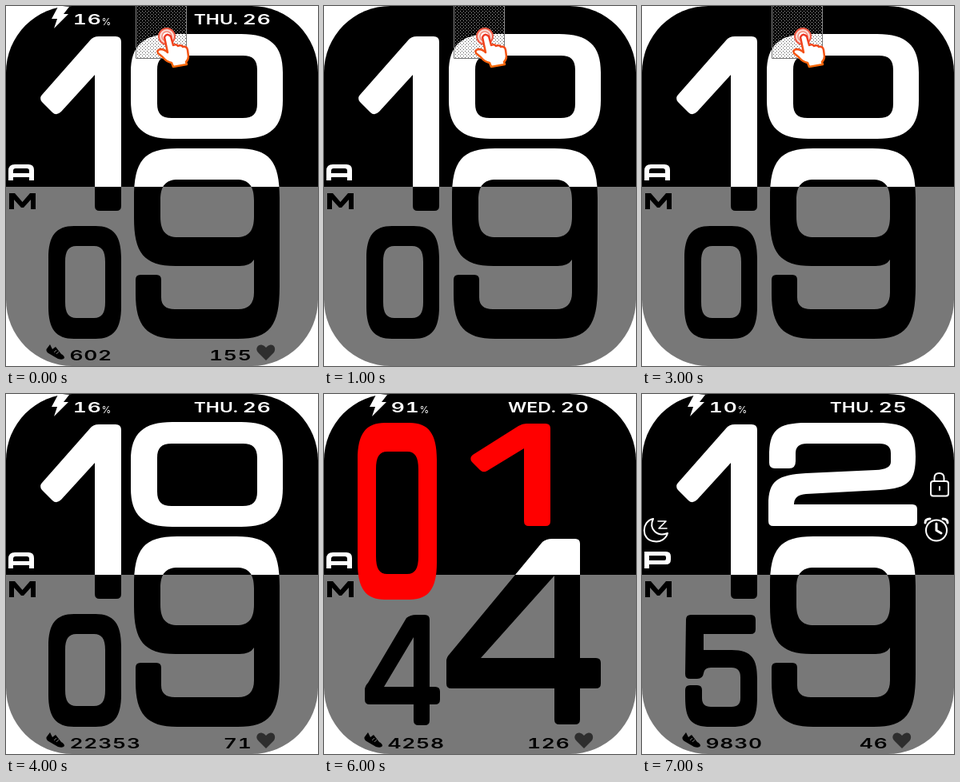
An HTML page that plays this animation: 390x450 px, repeating every 8 s.

```html
<!DOCTYPE html>
<html lang="en">
<head>
<meta charset="utf-8">
<title>Watch face</title>
<style>
html, body { margin: 0; width: 100%; height: 100%; overflow: hidden; background: #fff; }
svg { display: block; width: 390px; height: 450px; }
text { font: 600 17px Inter, sans-serif; font-variant-numeric: tabular-nums; letter-spacing: .5px; }
.day { letter-spacing: 0; }
.pct { font-size: 12px; font-weight: 400; letter-spacing: 0; }
.end { text-anchor: end; }
.line { fill: none; stroke: #fff; stroke-width: 2; stroke-linecap: round; stroke-linejoin: round; }
.dots { mix-blend-mode: difference; }
</style>
</head>
<body>
<svg viewBox="0 0 390 450" xmlns="http://www.w3.org/2000/svg">
  <defs>
    <clipPath id="face"><rect width="390" height="450" rx="83"/></clipPath>
    <linearGradient id="split" gradientUnits="userSpaceOnUse" x1="0" y1="0" x2="0" y2="452">
      <stop offset=".5" stop-color="#fff"/><stop offset=".5" stop-color="#000"/>
    </linearGradient>
    <linearGradient id="warm" x1="0" y1="0" x2="0" y2="1">
      <stop offset="0" stop-color="#ee3524"/><stop offset="1" stop-color="#f86a08"/>
    </linearGradient>
    <pattern id="dot" width="4" height="4" patternUnits="userSpaceOnUse">
      <path d="M0 0h1v1h-1zM2 2h1v1h-1z" fill="#aaa"/>
    </pattern>
  </defs>
  <g clip-path="url(#face)">
    <rect width="390" height="450"/>
    <rect y="226" width="390" height="224" fill="#787878"/>
    <path id="h1"/><path id="h2"/><path id="m1"/><path id="m2"/>

    <path id="am" fill="#fff" fill-rule="evenodd"/>
    <path d="M4 254V234H11L20.500 245L30 234H37V254H31V242L22 252H19L10 242V254Z"/>

    <g id="moon" class="line">
      <path d="M14 156C-1 159 -1 182 14 184C23 186 30 181 32 174C19 179 8 169 14 156Z"/>
      <path d="M20 159H30L21 168H31" stroke-width="1.6"/>
    </g>
    <g id="status" class="line">
      <rect x="361" y="109" width="22" height="18.500" rx="3"/>
      <path d="M365.500 109V105Q365.500 99 371.500 99Q377.500 99 377.500 105V109M372 116V120"/>
      <circle cx="368" cy="170.500" r="13"/>
      <path d="M368 162V170.500L374 174M354 161Q354 156 360 156M376 156Q382 156 382 161" stroke-width="3"/>
    </g>

    <g id="info">
      <path fill="#fff" d="M65 1H79L72 10H78L60 28L64 16H57Z"/>
      <g fill="#fff">
        <g transform="translate(119.500 23) scale(1.55 1)"><text id="power" class="end"/></g>
        <text class="pct" x="119.500" y="23.500">%</text>
        <g transform="translate(290 23) scale(1.35 1)"><text id="day" class="day end"/></g>
        <g transform="translate(331.500 23) scale(1.55 1)"><text id="date" class="end"/></g>
      </g>
      <path d="M55 423L50.500 429Q50 432 53 434L65 441Q71 443 73 440Q73 437 69 435L62 426L58 429Z"/>
      <path d="M60 433l3 -3M63 435l3 -3" stroke="#787878"/>
      <g transform="translate(79.500 442.500) scale(1.55 1)"><text id="steps"/></g>
      <g transform="translate(307.500 442.500) scale(1.55 1)"><text id="pulse" class="end"/></g>
      <path fill="#2e2e2e" d="M325 443L315 433C311 428 315 423 319.500 423.500Q323 424 325 427Q327 424 330.500 423.500C335 423 338 428 335 433Z"/>
    </g>

    <g id="tap">
      <g class="dots">
        <rect x="162" width="64" height="66" fill="url(#dot)"/>
        <path d="M162.500 0V65.500H225.500V0" fill="none" stroke="#888"/>
      </g>
      <circle cx="201" cy="38" r="10" fill="#fbd9d3" stroke="#ef5a45" stroke-width="2"/>
      <circle cx="201" cy="38" r="6" fill="#fff" stroke="#f08a78" stroke-width="1.500"/>
      <path fill="#fff" stroke="url(#warm)" stroke-width="2.500" stroke-linejoin="round"
        d="M198 39Q201 33 206 38L209 49Q213 47 215 50Q219 48 221 51Q226 50 227 55L228 63Q228 67 225 70L226 73L209 76L207 71Q201 70 196 64L190 59Q188 55 193 54Q198 54 202 58Z"/>
    </g>
  </g>
</svg>
<script>
const $ = id => document.getElementById(id);

// Soft-cornered box; passing the right edge first reverses it into a hole.
function box(l, t, r, b, k, ky) {
  const kx = l < r ? k : -k, x = kx * .3, y = ky * .3;
  return `M${l + kx} ${t}H${r - kx}C${r - x} ${t} ${r} ${t + y} ${r} ${t + ky}V${b - ky}` +
    `C${r} ${b - y} ${r - x} ${b} ${r - kx} ${b}H${l + kx}C${l + x} ${b} ${l} ${b - y} ${l} ${b - ky}` +
    `V${t + ky}C${l} ${t + y} ${l + x} ${t} ${l + kx} ${t}Z`;
}

// s: stem sides, c: crossbar edges, top: left end of the top edge, tri: hole corner x and y.
function four([l, t, r, b], [s0, s1], [c0, c1], top, [tx, ty]) {
  const q = 6, rise = c0 - 5;
  return `M${top + 6} ${t}H${s1 - q}Q${s1} ${t} ${s1} ${t + q}V${c0}H${r - q}Q${r} ${c0} ${r} ${c0 + q}` +
    `V${c1 - q}Q${r} ${c1} ${r - q} ${c1}H${s1}V${b - q}Q${s1} ${b} ${s1 - q} ${b}H${s0 + q}` +
    `Q${s0} ${b} ${s0} ${b - q}V${c1}H${l + q}Q${l} ${c1} ${l} ${c1 - q}V${c0 + 4}` +
    `Q${l} ${c0 - 1} ${l + 4} ${rise}L${top - 6} ${t + 4}Q${top - 1} ${t} ${top + 6} ${t}Z` +
    `M${s0} ${ty}L${tx} ${c0}H${s0}Z`;
}

const shapes = {
  h1: {
    0: box(42, 36, 141, 257, 34, 46) + box(118, 72, 65, 225, 14, 22),
    1: "M116 38H137Q144 38 144 45V250Q144 256 138 256H117Q111 256 111 250V86L69 132Q63 138 58 133L45 120Q41 115 45 111L105 43Q109 38 116 38Z"
  },
  h2: {
    0: box(156, 35, 346, 166, 52, 48) + box(314, 62, 189, 140, 18, 18),
    1: "M253 37H277Q283 37 283 43V159Q283 165 277 165H256Q250 165 250 159V68L204 96Q199 99 195 95L185 85Q181 80 186 76L243 40Q248 37 253 37Z",
    2: "M159 86V78C159 46 168 36 206 36H294C332 36 342 46 342 78C342 108 334 118 298 120L205 125Q190 126 190 138H338Q344 138 344 144V159Q344 165 338 165H164Q158 165 158 159V138C158 108 170 101 205 99L292 95Q311 94 311 85V74Q311 62 297 62H206Q192 62 192 74V84Q192 93 184 93H166Q159 93 159 86Z",
    4: four([153, 37, 346, 165], [288, 319], [114, 138], 277, [207, 67])
  },
  m1: {
    0: box(53, 275, 144, 416, 32, 40) + box(124, 300, 74, 390, 14, 20),
    4: four([51, 276, 145, 414], [112, 132], [366, 388], 109, [75, 304]),
    5: "M61 276H136Q142 276 142 282V294Q142 300 136 300H77V320H112C138 320 144 332 144 356V378C144 406 138 416 112 416H86C60 416 54 406 54 378V370Q54 364 60 364H69Q75 364 75 370V380Q75 391 86 391H112Q123 391 123 380V354Q123 342 112 342H86Q78 342 77 349Q76 356 69 356H60Q54 356 54 350L55 282Q55 276 61 276Z"
  },
  m2: {
    4: four([153, 181, 346, 413], [288, 320], [330, 368], 279, [196, 227]),
    8: box(161, 179, 341, 302, 52, 48) + box(310, 217, 193, 276, 18, 24) +
       box(158, 285, 344, 416, 52, 48) + box(312, 312, 192, 379, 20, 24),
    9: "M162 342V360C162 400 176 416 214 416H290C330 416 342 400 342 350V240C342 194 330 178 288 178H214C172 178 160 194 160 240V265C160 308 172 325 212 325H292Q305 325 310 317V358Q310 379 290 379H211Q194 379 194 364V342Q194 336 188 336H168Q162 336 162 342Z" +
       box(193, 217, 310, 289, 22, 26)
  }
};

const letters = {
  A: "M3 218V206Q3 198 11 198H28Q35 198 35 205V218H29V214H9V218ZM9 209H29V206Q29 203 26 203H12Q9 203 9 206Z",
  P: "M3 218V197H30Q36 197 36 203V207Q36 213 30 213H9V218ZM9 208H28Q30 208 30 206V204Q30 202 28 202H9Z"
};

const first = { time: "1009", half: "A", power: 16, day: "THU.", date: "26", steps: 602, pulse: 155, tap: true };
const bare = { ...first, plain: true };
const scenes = [
  first, bare, first, bare,
  { ...first, steps: 22353, pulse: 71, tap: false },
  { time: "0408", half: "P", power: 42, day: "TUE.", date: "06", steps: 12736, pulse: 93, red: true, moon: true },
  { time: "0144", half: "A", power: 91, day: "WED.", date: "20", steps: 4258, pulse: 126, red: true },
  { time: "1259", half: "P", power: 10, day: "THU.", date: "25", steps: 9830, pulse: 46, moon: true, status: true }
];

const show = (id, on) => $(id).setAttribute("visibility", on ? "visible" : "hidden");
let shown;

function draw(ms) {
  const s = scenes[Math.floor(ms / 1000) % scenes.length];
  if (s === shown) return;
  shown = s;
  ["h1", "h2", "m1", "m2"].forEach((id, i) => {
    $(id).setAttribute("d", shapes[id][s.time[i]]);
    $(id).setAttribute("fill", s.red && i < 2 ? "#f00" : "url(#split)");
  });
  $("am").setAttribute("d", letters[s.half]);
  for (const id of ["power", "day", "date", "steps", "pulse"]) $(id).textContent = s[id];
  for (const id of ["moon", "status", "tap"]) show(id, s[id]);
  show("info", !s.plain);
}

function tick() {
  draw(performance.now());
  requestAnimationFrame(tick);
}
tick();
</script>
</body>
</html>
```
